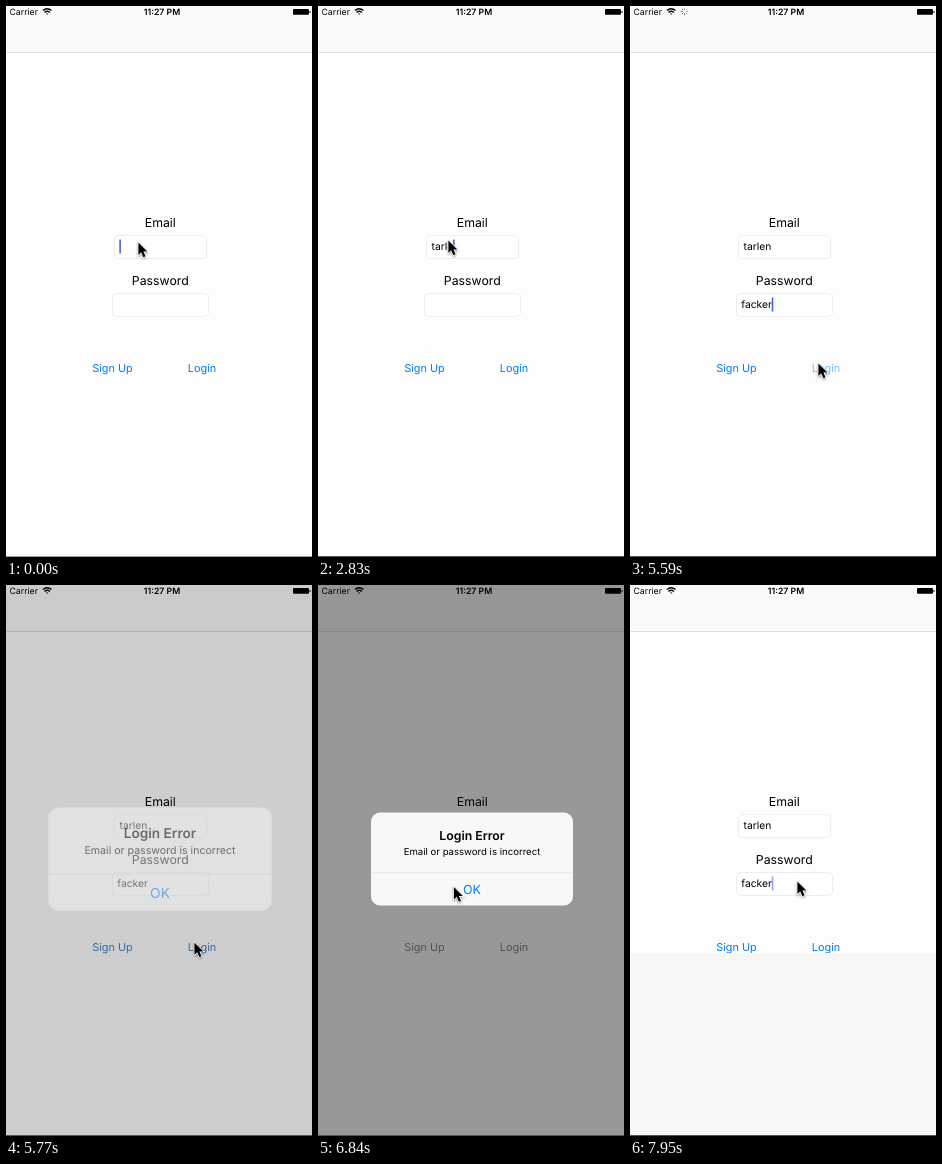
Recreate the animation shown at these times as an HTML page. Size 306 px wide and 551 px high, loop 8000 ms.

```html
<!DOCTYPE html>
<html>
<head>
<meta charset="utf-8">
<style>
html, body { margin: 0; width: 100%; height: 100%; overflow: hidden; background: #fdfdfd }
svg { display: block; width: 306px; height: 551px; font-family: Inter, Roboto, sans-serif }
text { text-rendering: geometricPrecision }
.mid { text-anchor: middle }
.big { font-size: 12.3px }
.button { font-size: 10.9px }
.input { font-size: 10.3px }
.status { font-size: 8.7px }
.field { fill: #fff; stroke: #e9e9e9; stroke-width: .8 }
</style>
</head>
<body>
<svg viewBox="0 0 306 551">
  <rect width="306" height="551" fill="#fdfdfd"/>
  <rect width="306" height="46" fill="#fafafa"/>
  <path d="M0 46.5H306" stroke="#dedede"/>

  <text class="big mid" x="154.3" y="220.8">Email</text>
  <rect class="field" x="108.5" y="229.5" width="92" height="23" rx="4"/>
  <text class="input" id="email" x="113.5" y="244.4"></text>
  <text class="big mid" x="154.3" y="278.8">Password</text>
  <rect class="field" x="106.5" y="287.5" width="96" height="23" rx="4"/>
  <text class="input" id="pass" x="111.3" y="302.4"></text>
  <rect id="caret" width="1.6" height="14" fill="#4568e0"/>

  <g id="buttons" class="button mid">
    <text x="106.5" y="365.6">Sign Up</text>
    <text id="login" x="196" y="365.6">Login</text>
  </g>

  <rect id="keyboard" width="306" height="183" fill="#f7f7f7"/>
  <rect id="dim" width="306" height="551"/>

  <g class="status">
    <text x="3.5" y="9">Carrier</text>
    <text class="mid" x="156" y="9" font-weight="600">11:27 PM</text>
    <g fill="none" stroke="#000" stroke-width="1.3">
      <path d="M36.9 4.6Q41.2 .9 45.5 4.6M38.5 6.4Q41.2 4.1 43.9 6.4"/>
      <path d="M39.9 7.4H42.5L41.2 8.8Z" fill="#000" stroke="none"/>
    </g>
    <rect x="287" y="3" width="16" height="5.8" rx="1"/>
    <rect x="303.5" y="4.9" width="1" height="2" rx=".5"/>
  </g>
  <g id="spinner" stroke-width=".9"></g>

  <g id="alert" class="mid">
    <rect x="53" y="227.5" width="202" height="93" rx="9" fill="#f8f8f8"/>
    <path d="M53 287.7H255" stroke="#e0e0e2" stroke-width=".8"/>
    <text x="154" y="254.8" font-size="12.3" font-weight="600">Login Error</text>
    <text x="154" y="269.8" font-size="9.6">Email or password is incorrect</text>
    <text x="154" y="309" font-size="12.5" fill="#007aff">OK</text>
  </g>

  <path id="edge" d="M0 550.5H306"/>

  <path id="cursor" d="M.4.4V12.9L3.2 10.3 5.4 15.2 7.5 14.2 5.4 9.5H9.4Z"
    stroke="#fff" stroke-width="1.4" paint-order="stroke"
    style="filter: drop-shadow(0 1px 1px rgba(0,0,0,.4))"/>
</svg>
<script>
const $ = id => document.getElementById(id);
const clamp = v => Math.min(1, Math.max(0, v));
const mix = (a, b, p) => a + (b - a) * p;
const ramp = (t, from, to) => clamp((t - from) / (to - from));
const smooth = p => p * p * (3 - 2 * p);
const set = (id, attrs) => { for (const k in attrs) $(id).setAttribute(k, attrs[k]); };

// Pointer moves: start, end, x, y
const MOVES = [
  [1360, 1590, 130, 234], [3250, 3540, 142, 303], [3800, 4010, 149, 307],
  [5070, 5500, 188, 357], [5808, 6000, 183, 89], [6180, 6540, 134, 294],
  [6720, 6900, 136, 304], [7080, 7490, 169, 293], [7540, 7950, 167, 296]
];
const pointer = t => MOVES.reduce(([x, y], [from, to, toX, toY]) => {
  const p = smooth(ramp(t, from, to));
  return [mix(x, toX, p), mix(y, toY, p)];
}, [132, 236]);

const EMAIL = { word: 'tarlen', start: 2190, step: 140 };
const PASS = { word: 'facker', start: 4300, step: 120 };
const lastKey = f => f.start + (f.word.length - 1) * f.step;
const typed = (f, t) => f.word.slice(0, Math.max(0, Math.floor((t - f.start) / f.step) + 1));

// The caret blinks once a second, starting over after taps and typing
const RESETS = [-140, 1590, lastKey(EMAIL), 3900, lastKey(PASS), 5200, 7380];
function caretOpacity(t) {
  if (t > 5770 && t < 7400) return 0;
  if ([EMAIL, PASS].some(f => t >= f.start && t < lastKey(f))) return 1;
  const age = t - RESETS.filter(r => r <= t).pop(), u = age % 1000;
  const on = age < 1000 ? 1 : ramp(u, -40, 80);
  return u < 500 ? on : 1 - ramp(u, 500, 670) + ramp(u, 960, 1080);
}

for (let i = 0; i < 8; i++)
  $('spinner').innerHTML += `<path d="M0-1.8V-3.8" stroke="rgba(0,0,0,${.3 + i * .06})"
    transform="translate(54.5 5.6) rotate(${i * 45})"/>`;

function draw(t) {
  $('email').textContent = typed(EMAIL, t);
  $('pass').textContent = typed(PASS, t);
  const inPass = t >= 3900, field = $(inPass ? 'pass' : 'email');
  set('caret', {
    x: +field.getAttribute('x') + field.getComputedTextLength() - .2,
    y: inPass ? 291.5 : 233.5,
    opacity: caretOpacity(t)
  });

  // The alert springs in from a larger size and later fades in place
  const shown = t < 5770 ? 0 : 1 - Math.exp((5750 - t) / 33);
  const p = shown * (1 - smooth(ramp(t, 6900, 7140)));
  const scale = 1.2 - .2 * shown;
  set('dim', { opacity: .4 * p });
  set('alert', { opacity: p, transform: `translate(154 274) scale(${scale}) translate(-154 -274)` });
  set('buttons', { fill: `rgb(${mix(0, 134, p)},${mix(122, 134, p)},${mix(255, 134, p)})` });

  const pressed = t >= 5420 && t < 5770;
  set('login', { opacity: pressed ? mix(.2, .5, ramp(t, 5500, 5590)) : 1 });
  set('spinner', { opacity: t >= 5530 && t < 5770 ? 1 : 0 });

  const rise = 1 - (1 - ramp(t, 7190, 7490)) ** 3;
  set('keyboard', { y: mix(551, 368, rise) });
  set('edge', { stroke: t < 1590 ? '#999' : '#555' });
  set('cursor', { transform: `translate(${pointer(t)})` });
}

function frame(now) {
  draw(now % 8000);
  requestAnimationFrame(frame);
}
requestAnimationFrame(frame);
</script>
</body>
</html>
```
